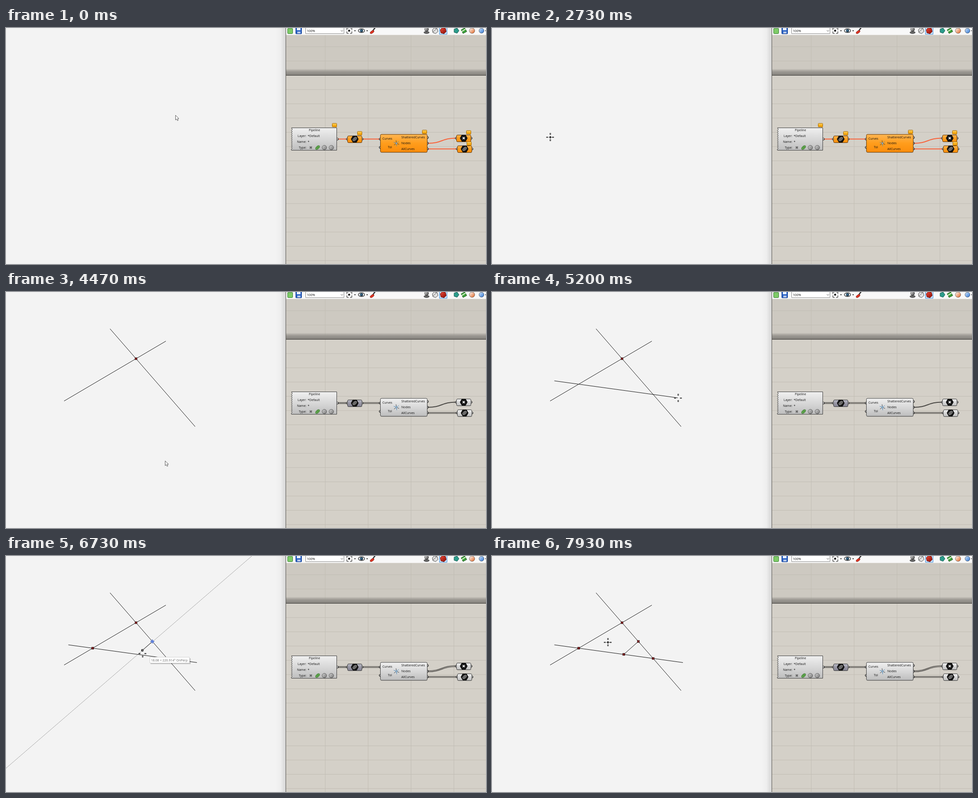
Recreate the animation shown at these times as an HTML page with a canvas. Size 1066 by 526 pixels, loop 8 s.

```html
<!DOCTYPE html>
<html lang="en">
<head>
<meta charset="utf-8">
<title>Curve pipeline</title>
<style>
html, body { margin: 0; width: 100%; height: 100%; overflow: hidden; background: #f3f3f3; }
canvas { display: block; }
</style>
</head>
<body>
<canvas id="stage" width="1066" height="526"></canvas>
<script>
const c = document.getElementById('stage').getContext('2d');
const LOOP = 8000, TICK = LOOP / 120;

// ---------- drawing helpers ----------
function fade(x0, y0, x1, y1, ...stops) {
  const g = c.createLinearGradient(x0, y0, x1, y1);
  stops.forEach((s, i) => g.addColorStop(i / (stops.length - 1), s));
  return g;
}
function paint(fill, stroke, lw = 1) {
  if (fill) { c.fillStyle = fill; c.fill(); }
  if (stroke) { c.strokeStyle = stroke; c.lineWidth = lw; c.stroke(); }
}
function flat(x, y, w, h, color) {
  c.fillStyle = color;
  c.fillRect(x, y, w, h);
}
function box(x, y, w, h, fill, stroke, r = 0) {
  c.beginPath();
  c.roundRect(x, y, w, h, r);
  paint(fill, stroke);
}
function poly(pts, fill, stroke, lw) {
  c.beginPath();
  pts.forEach(p => c.lineTo(...p));
  if (fill) c.closePath();
  paint(fill, stroke, lw);
}
function line(x0, y0, x1, y1, color = '#111', lw = 1) {
  poly([[x0, y0], [x1, y1]], null, color, lw);
}
function oval(x, y, rx, ry, fill, stroke, lw, turn = 0) {
  c.beginPath();
  c.ellipse(x, y, rx, ry, turn, 0, 7);
  paint(fill, stroke, lw);
}
function ball(x, y, r, light, dark) {
  oval(x, y, r, r, fade(x - r, y - r, x + r, y + r, light, dark), '#0009', .8);
}
function gem(x, y, r, sides, fill, stroke, turn = 0) {
  const corner = (_, i) => {
    const a = turn + i * 2 * Math.PI / sides;
    return [x + r * Math.cos(a), y + r * Math.sin(a)];
  };
  poly(Array.from({ length: sides }, corner), fill, stroke);
}
function cross(x, y, r, color, lw) {
  line(x - r, y - r, x + r, y + r, color, lw);
  line(x - r, y + r, x + r, y - r, color, lw);
}
function text(s, x, y, align = 'left', size = 6.8, color = '#111') {
  c.font = size + 'px "Open Sans", "Noto Sans", sans-serif';
  c.textAlign = align;
  c.fillStyle = color;
  c.fillText(s, x, y);
}

// ---------- node editor ----------
function backdrop() {
  flat(0, 0, 1066, 526, '#f3f3f3');
  flat(598, 0, 23, 526, fade(598, 0, 621, 0, '#f3f3f3', '#eeeeee', '#d6d6d6'));
  flat(622, 0, 444, 526, '#d4d0c8');
  flat(622, 15, 444, 90, '#cdc9c1');
  for (let x = 708.5; x < 1066; x += 95.25) flat(x, 15, 1, 511, '#c1bdb4');
  for (let y = 41.3; y < 526; y += 31.77) flat(622, y, 444, 1, '#c1bdb4');
  flat(622, 91, 444, 14, fade(0, 91, 0, 105, '#8a878200', '#9a9791', '#85827d'));
  flat(622, 105, 444, 1, '#33322f');
  flat(621, 0, 1, 526, '#55534f');
}

function toolbar() {
  flat(622, 0, 444, 15, '#f8f8f8');
  flat(622, 15, 444, 1, '#e2e0dc');

  box(625.5, 1, 11, 11.5, '#7fcb68', '#2c7a26', 1);
  box(643.5, -4, 13, 17, '#2a62c4', '#173f8d', 1);
  flat(646, 0, 8, 5, '#e9f1ff');
  flat(647, 8, 7, 4, '#b8c9e8');

  box(665.5, -2.5, 85, 15, '#fff', '#8b8b8b');
  text('100%', 668, 8.5, 'left', 7.2);
  poly([[743.5, 5], [746, 7.5], [748.5, 5]], null, '#555');

  box(757, 0, 11, 12, null, '#111');
  flat(761, -2, 3, 16, '#f8f8f8');
  flat(755, 4.5, 15, 3, '#f8f8f8');
  flat(760, 4, 4, 4, '#222');
  for (const x of [775, 802, 1066]) gem(x, 6, 2, 3, '#222', null, Math.PI / 2);
  oval(789.5, 6, 7, 4.2, '#f4f8fb', '#222', 1.2);
  ball(789.5, 6, 3.2, '#4f8bb5', '#122f44');
  line(814, 7, 820, -1, '#333', 2.5);
  oval(813, 9, 5, 2.5, '#dd3322', '#7d1a10', .8, -.6);

  ball(934, 3, 4.5, '#eee', '#333');
  oval(934, 10, 6, 2.5, '#666', '#222', .7);
  gem(953, 6, 6.5, 6, '#e2e2e2', '#444', .3);
  line(948, 9, 957, 1, '#555');
  box(962.5, -3, 17, 17, '#cfe5fa', '#3b8ad8');
  gem(971, 6, 7, 6, fade(965, 0, 977, 12, '#ee4a38', '#8b0f08'), '#6b0a06', .3);
  gem(1000, 6, 6, 5, '#2a9c8b', '#15584e');
  gem(1017, 6, 6.5, 4, '#3fa53c', '#1d4f1b', .3);
  line(1012, 8, 1021, 2, '#e9f5dc', 2);
  ball(1035, 6, 6, '#fff', '#e0601c');
  ball(1056, 6, 5.5, '#cfe6ff', '#2f74d0');
}

const SKINS = {
  warn: ['#ffb552', '#ff9d1c', '#fb8d0c'],
  plain: ['#f0f0f0', '#d8d8d8', '#bdbdbd'],
  dim: ['#b9b9c4', '#9998a6', '#82818f']
};
const skin = (y, h, tone) => fade(0, y, 0, y + h, ...SKINS[tone]);

function shell(x, y, w, h, tone) {
  box(x + .5, y + 1, w, h, '#0002', null, 2.5);
  box(x, y, w, h, skin(y, h, tone), tone == 'warn' ? '#5e3505' : '#3d3d3d', 2.5);
}
const grip = (x, y) => oval(x, y, 2, 2, '#fff', '#111', 1.2);

function swirl(x, y, r, color) {
  oval(x, y, r, r * .55, null, color, 1, -.75);
  oval(x, y, r * .5, r * .2, null, color, 1, -.75);
}
function param(x, y, tone, isPoint) {
  grip(x, y);
  grip(x + 33, y);
  shell(x + .5, y - 7, 32, 15, tone);
  gem(x + 16.5, y, 8, 6, '#171717', '#000');
  if (isPoint) cross(x + 16.5, y, 2.2, '#fff', 1.7);
  else swirl(x + 16.5, y, 5, '#d5d5d5');
}
function balloon(x, y) {
  poly([[x + 6, y + 7], [x + 10, y + 7], [x + 9, y + 11]], '#d98b06');
  box(x + .5, y + .5, 10, 8, fade(0, y, 0, y + 8, '#ffe08a', '#f9b320', '#f0a00a'), '#a56a08', 1);
}

function pipeline() {
  const edge = [[634, 222.5], [734.5, 222.5], [734.5, 272.5], [634, 272.5]];
  for (let y = 270; y > 224; y -= 4.6) edge.push([633.5, y], [636, y - 2.3]);
  grip(736, 247.5);
  poly(edge, skin(222, 51, 'plain'), '#3d3d3d');
  text('Pipeline', 685, 230, 'center');
  [['Layer:', '*Default'], ['Name:', '*'], ['Type:', '']].forEach(([label, value], i) => {
    text(label, 667, 242.7 + 13 * i, 'right');
    text(value, 670, 242.7 + 13 * i);
  });
  cross(677, 266.5, 2.3, '#666', 2);
  oval(692, 266.5, 5.5, 3, '#7cc566', null, 1, -.75);
  swirl(692, 266.5, 5.5, '#23611a');
  for (const x of [707, 722.5]) ball(x, 266.5, 5, '#d2d2d2', '#777');
}

function shatter(tone) {
  const outputs = ['ShatteredCurves', 'Nodes', 'AllCurves'];
  for (const y of [247.5, 266]) grip(831, y);
  outputs.forEach((_, i) => grip(936, 244 + 12.7 * i));
  shell(831.5, 237, 104, 40, tone);
  outputs.forEach((name, i) => text(name, 878, 246.2 + 12.7 * i));
  text('Curves', 836, 249);
  text('Tol', 857, 268.3, 'right');
  for (let i = 0; i < 6; i++) {
    const a = .4 + i * Math.PI / 3, dx = Math.cos(a), dy = Math.sin(a);
    line(867 + 2 * dx, 257 + 2 * dy, 867 + 6.5 * dx, 257 + 6.5 * dy, i % 2 ? '#4c86b8' : '#39434c');
  }
  oval(867, 257, 1.5, 1.5, '#dff0ff', '#2d6a9a', .9);
}

// kind: 0 empty, 1 single item, 2 list
function wire(x0, y0, x1, y1, kind) {
  const mid = (x0 + x1) / 2;
  const draw = (color, lw) => {
    c.beginPath();
    c.moveTo(x0, y0);
    c.bezierCurveTo(mid, y0, mid, y1, x1, y1);
    paint(null, color, lw);
  };
  draw(['#f96138', '#494744', '#4e4c49'][kind], [2, 2, 3.6][kind]);
  if (kind == 2) draw('#aaa69f', 1.3);
}

function editor(curves) {
  const tone = curves ? 'plain' : 'warn';
  const list = Math.min(curves, 2);
  backdrop();
  toolbar();
  wire(737, 247.5, 757, 247.5, list);
  wire(793, 247.5, 830, 247.5, list);
  wire(937, 257, 999, 245.5, Math.min(Math.max(0, curves - 1), 2));
  wire(937, 269.5, 1001, 269.5, list);
  pipeline();
  param(758, 247.5, curves ? 'dim' : 'warn');
  shatter(tone);
  param(1000, 245.5, tone, true);
  param(1002, 269.5, tone);
  if (!curves)
    for (const [x, y] of [[724, 212], [780, 230], [924, 227], [1022, 228], [1023, 253]]) balloon(x, y);
}

// ---------- viewport ----------
// Ticks: crosshair shown (aim), first click (start), second click (done).
// via is a waypoint [tick, x, y] on the way to a.
const strokes = [
  { aim: 34, start: 41, done: 47, a: [129, 243], b: [355, 109.5] },
  { aim: 53, start: 55, done: 62, a: [231, 82], b: [420, 300], via: [51, 243, 134] },
  { aim: 71, start: 74, done: 80, a: [138.5, 198], b: [424, 237.5], via: [67, 353, 376] },
  { aim: 85, start: 97, done: 107, a: [325, 190.5], b: [293, 219], via: [87, 328, 263], tracked: true },
  { aim: 115, start: 119, done: 130, a: [257, 192], b: [257, 192], via: [113, 298, 254] }
];

const path = [[0, 376, 194], [4, 305, 260], [7, 305, 260], [12, 276, 260], [33, 279, 261]];
for (const { start, done, a, b, via } of strokes) {
  if (via) path.push(via);
  path.push([start - 1, ...a], [start, ...a], [done - 1, ...b], [done + 1, ...b]);
}

function cursorAt(n) {
  const i = path.findIndex(k => k[0] > n);
  const [t0, x0, y0] = path[i - 1], [t1, x1, y1] = path[i];
  const u = 1 - (1 - (n - t0) / (t1 - t0)) ** 2;
  return [x0 + (x1 - x0) * u, y0 + (y1 - y0) * u];
}

function lookAt(n) {
  const typing = n >= 23 && n < 27 || n >= 31 && n < 34;
  if (typing) return 'none';
  const s = strokes.find(s => n < s.done);
  return n == s.start ? 'dot' : n >= s.aim ? 'aim' : 'arrow';
}

function drawCursor(look, x, y) {
  x = Math.round(x);
  y = Math.round(y);
  if (look == 'none') return;
  if (look == 'arrow') {
    const shape = [[0, 0], [0, 10.5], [2.4, 8.3], [4.2, 12], [6, 11.2], [4.4, 7.6], [7.5, 7.4]];
    return poly(shape.map(([dx, dy]) => [x + .5 + dx, y + .5 + dy]), '#fff', '#333', .8);
  }
  for (const s of [-1, 1]) {
    box(x - .5, y + s * 7 - 1.5, 2, 3, '#fff', '#222');
    flat(x + s * 6.5 - 2, y - .5, 4, 2, '#222');
  }
  if (look == 'dot') {
    flat(x - 1, y - 2, 3, 5, '#333');
    flat(x - 3, y, 7, 1, '#333');
  }
}

// Perpendicular guide, start marker, snapped point and its read-out
function tracking([ox, oy], x, y) {
  c.setLineDash([1.5, .7]);
  line(0, 473, 546, 0, '#666', .8);
  c.setLineDash([]);
  line(ox, oy, x, y);
  gem(ox, oy, 4, 4, '#9db5f2', '#5678d8');
  line(ox - 4, oy, ox + 4, oy, '#3459c4');
  line(ox, oy - 4, ox, oy + 4, '#3459c4');
  oval(x, y, 2, 2, '#f3f3f3', '#111', 1.3);

  const tx = Math.round(x) + 16, ty = Math.round(y) + 16;
  const length = Math.hypot(ox - x, oy - y) * .6103;
  box(tx + 2, ty + 2, 89, 13, '#0003');
  box(tx + .5, ty - .5, 88, 13, '#fff', '#d2d2d2');
  text(`${length.toFixed(2)} < 220.914° OnPerp`, tx + 3, ty + 9, 'left', 7, '#666');
}

function crossing(p, q) {
  const [px, py] = p.a, [qx, qy] = q.a;
  const rx = p.b[0] - px, ry = p.b[1] - py, sx = q.b[0] - qx, sy = q.b[1] - qy;
  const det = rx * sy - ry * sx;
  const u = ((qx - px) * sy - (qy - py) * sx) / det;
  const v = ((qx - px) * ry - (qy - py) * rx) / det;
  const inside = k => k > -.05 && k < 1.05;
  return inside(u) && inside(v) && [px + rx * u, py + ry * u];
}

function viewport(n, curves) {
  const [x, y] = cursorAt(n);
  for (const s of curves) line(...s.a, ...s.b);
  curves.forEach((p, i) => curves.slice(0, i).forEach(q => {
    const at = crossing(p, q);
    if (!at) return;
    cross(...at, 2.3, '#1c0000', 2.6);
    cross(...at, 1.7, '#a30f14', 1.2);
  }));
  const active = strokes.find(s => n >= s.start && n < s.done);
  if (active?.tracked) tracking(active.a, x, y);
  else if (active) line(...active.a, x, y);
  drawCursor(lookAt(n), x, active?.tracked ? y + 7 : y);
}

function frame(now) {
  const n = Math.floor((now % LOOP) / TICK + .1) % 120;
  const curves = strokes.filter(s => n >= s.done);
  editor(curves.length);
  viewport(n, curves);
  requestAnimationFrame(frame);
}
requestAnimationFrame(frame);
</script>
</body>
</html>
```
